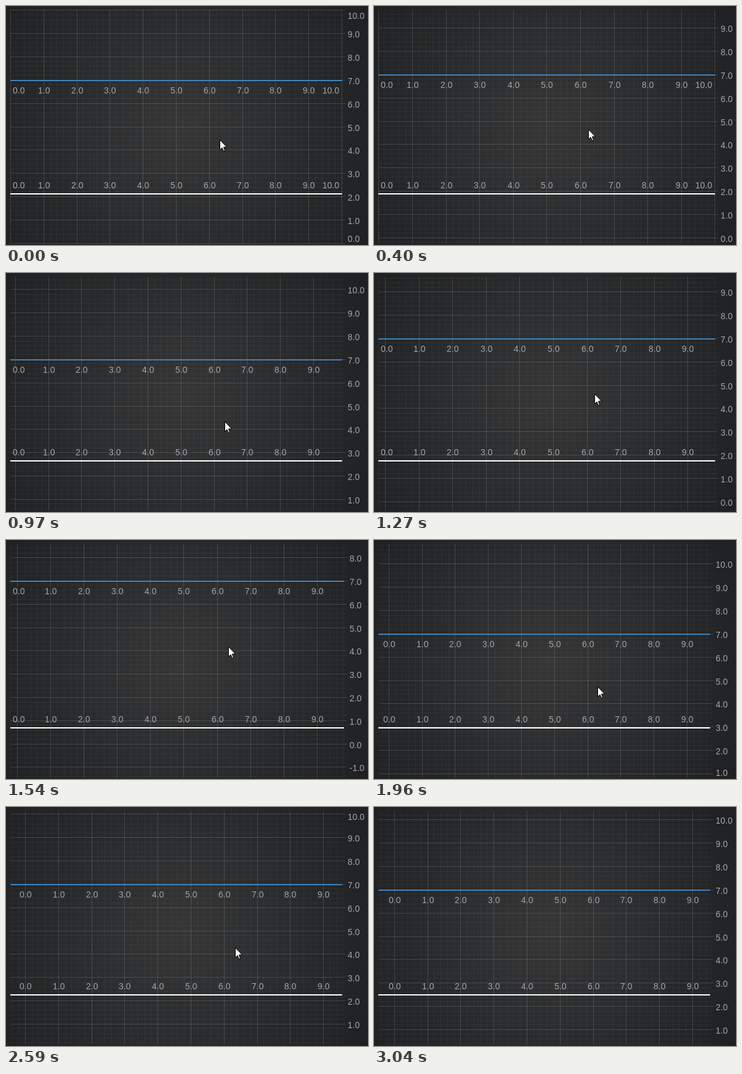
Animation of 588 by 388 pixels, one loop 3.5 s. Source, as an HTML page:

```html
<!DOCTYPE html>
<html lang="en">
<head>
<meta charset="utf-8">
<title>Panning chart</title>
<style>
html, body { margin: 0; width: 100%; height: 100%; overflow: hidden; background: #222324; }
svg { display: block; }
text { font: 14px "Liberation Sans", Arial, sans-serif; fill: #a6a7ac; }
.minor { stroke: #fff; stroke-opacity: .04; }
.major { stroke: #fff; stroke-opacity: .14; }
</style>
</head>
<body>
<svg width="588" height="388" viewBox="0 0 588 388">
  <defs>
    <radialGradient id="glow" gradientUnits="userSpaceOnUse" cx="284" cy="200" r="360">
      <stop offset="0" stop-color="#363637"/>
      <stop offset=".35" stop-color="#2d2e2f"/>
      <stop offset=".7" stop-color="#252627"/>
      <stop offset="1" stop-color="#1f2021"/>
    </radialGradient>
  </defs>
  <rect width="588" height="388" fill="url(#glow)"/>
  <path id="minor" class="minor"/>
  <path id="major" class="major"/>
  <path id="blue" stroke="#4083ba" stroke-width="2"/>
  <path id="white" stroke="#fff" stroke-width="2"/>
  <g id="labels"></g>
  <path id="cursor" fill="#fff" stroke="#000" d="M0 0V16L3.5 12.5L6 18H8.2L6 11.5H11Z"/>
</svg>
<script>
const LOOP = 3500, LAG = 30;
const LEFT = 7, TOP = 6, BOTTOM = 386, UNIT_Y = 37.82, AXIS_Y = 305;
const GRAB = { x: 340, y: 96 };
const $ = id => document.getElementById(id);

// Redraw times: gaps counted in 30 ms ticks, starting at 340 ms.
const steps = [340];
for (const gap of "23232322232323222323332232332222823") {
  steps.push(steps[steps.length - 1] + gap * 30);
}

// Drag path: time, x of value 0, y of value 7.
const drag = [
  [305, 7.5, 121], [450, 9, 92], [610, 11.45, 53], [640, 11.5, 52.5],
  [800, 13, 98], [990, 16, 147], [1240, 18.5, 107], [1270, 18.5, 100.5],
  [1425, 18, 51], [1510, 18.45, 67], [1540, 21.5, 77.5], [1690, 25, 132],
  [1820, 27, 167], [1930, 24.3, 153], [1960, 23.5, 142.5], [2130, 18.5, 83],
  [2290, 18.45, 50], [2320, 18.5, 52.5], [2470, 26, 98], [2620, 33.3, 135]
];

// Hermite curve through the keys without overshoot.
function sample(keys, t, col) {
  const last = keys.length - 1;
  if (t <= keys[0][0]) return keys[0][col];
  if (t >= keys[last][0]) return keys[last][col];
  const i = keys.findIndex(k => k[0] > t) - 1;
  const rate = n => (keys[n + 1][col] - keys[n][col]) / (keys[n + 1][0] - keys[n][0]);
  const slope = n => {
    if (n === 0 || n === last) return 0;
    const a = rate(n - 1), b = rate(n);
    return a * b <= 0 ? 0 : 2 * a * b / (a + b);
  };
  const span = keys[i + 1][0] - keys[i][0];
  const u = (t - keys[i][0]) / span, v = 1 - u;
  return keys[i][col] * (1 + 2 * u) * v * v + keys[i + 1][col] * u * u * (3 - 2 * u)
    + span * u * v * (slope(i) * v - slope(i + 1) * u);
}

const dragAt = t => ({ x: sample(drag, t, 1), y: sample(drag, t, 2) });
const clamp = (v, lo, hi) => Math.min(hi, Math.max(lo, v));
const crisp = v => Math.floor(v) + .5;
const textWidth = s => Math.floor(14 * [...s].reduce(
  (w, c) => w + (c === "." ? .278 : c === "-" ? .333 : .556), 0));
const label = (x, y, s) => `<text x="${x}" y="${y}">${s}</text>`;

// Fifths of a unit whose position falls inside the range.
function ticks(position, lo, hi) {
  const list = [];
  for (let n = -25; n <= 65; n++) {
    const at = position(n / 5);
    if (at >= lo && at <= hi) list.push({ at, major: n % 5 === 0, text: (n / 5).toFixed(1) });
  }
  return list;
}

function drawChart(origin) {
  const y7 = Math.round(origin.y);
  const rows = ticks(v => y7 - .6 + (7 - v) * UNIT_Y, TOP, BOTTOM);
  const widest = Math.max(...rows.filter(r => r.major).map(r => textWidth(r.text)));
  const right = 573 - widest;
  const unitX = (right - LEFT - 1) / 10;
  const columns = ticks(v => origin.x + v * unitX, LEFT, right);

  const grid = { true: "", false: "" };
  let labels = "";
  for (const { at, major, text } of rows) {
    grid[major] += `M${LEFT} ${crisp(at)}H${right + (major ? 5 : 3)}`;
    if (major) labels += label(right + 9, clamp(Math.round(at + 6.5), 21, 383), text);
  }
  for (const { at, major, text } of columns) {
    grid[major] += `M${crisp(at)} ${TOP}V${BOTTOM}`;
    if (!major) continue;
    const w = textWidth(text);
    const x = Math.round(clamp(at - w / 2, LEFT + 4, right - 5 - w));
    labels += label(x, y7 + 21, text) + label(x, AXIS_Y - 9, text);
  }

  $("major").setAttribute("d", grid[true]);
  $("minor").setAttribute("d", grid[false]);
  $("blue").setAttribute("d", `M${LEFT} ${y7}H${right}`);
  $("white").setAttribute("d", `M${LEFT} ${AXIS_Y}H${right}`);
  $("labels").innerHTML = labels;
}

function cursorAt(t) {
  if (t >= 2950) return { x: 456.5, y: 317.5 };
  if (t >= 2890) return { x: 400.5, y: 260.5 };
  const p = dragAt(t);
  return { x: crisp(p.x + GRAB.x), y: crisp(p.y + GRAB.y) };
}

function render(t) {
  drawChart(dragAt(t - LAG));
  const p = cursorAt(t);
  $("cursor").setAttribute("transform", `translate(${p.x} ${p.y})`);
  $("cursor").setAttribute("visibility", t >= 3040 ? "hidden" : "visible");
}

const start = performance.now();
let shown = -1;
function frame() {
  const t = (performance.now() - start) % LOOP;
  const step = steps.filter(s => s <= t).pop() || 0;
  if (step !== shown) render(shown = step);
  requestAnimationFrame(frame);
}
frame();
</script>
</body>
</html>
```
